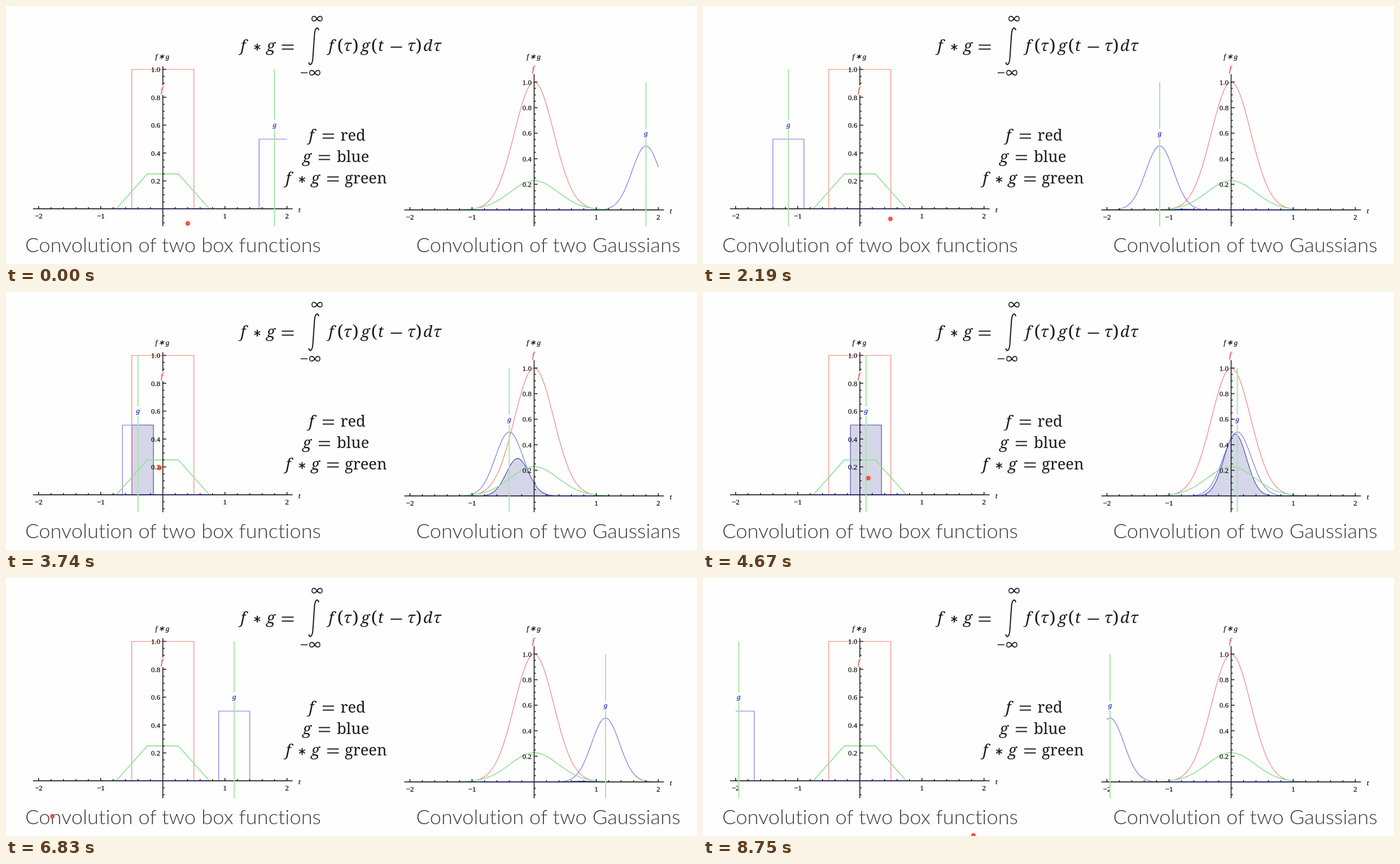
An HTML page that plays this animation: 1224 by 458 pixels, repeating every 8.85 s.

```html
<!DOCTYPE html>
<html lang="en">
<head>
<meta charset="utf-8">
<title>Convolution</title>
<style>
  html, body { margin: 0; width: 100%; height: 100%; overflow: hidden; background: #fefefe; }
  svg { display: block; width: 1224px; height: 458px; }
  text { text-anchor: middle; }
  .caption { font: 300 36.3px Lato, sans-serif; fill: #3c3c3c; font-variant-ligatures: none; }
  .math { font: italic 28px "Noto Serif", serif; fill: #1c1c1c; }
  .word { font: 27.4px "Noto Serif", serif; fill: #1c1c1c; text-anchor: start; }
  .sign { fill: none; stroke: #1c1c1c; stroke-width: 2; }
  .thin { stroke-width: 1.6; }
  .tick { font: 13px "Liberation Serif", serif; fill: #111; stroke: #111; stroke-width: .25; }
  .tick.right { text-anchor: end; }
  .label { font: italic 13px "Liberation Serif", serif; fill: #111; stroke-width: .25; }
  .axis { fill: none; stroke: #151515; stroke-width: 1.5; }
  .curve { fill: none; stroke-width: 1.2; stroke-linejoin: round; }
  .f { stroke: #f0857b; }
  .g { stroke: #7878dc; }
  .fg { stroke: #92e092; stroke-width: 1.6; }
  .base { stroke: #2c2c90; }
  .product { fill: #d6d6e9; stroke: #4848b4; stroke-width: 1.2; }
  .now { stroke: #a6e8a4; stroke-width: 2; }
</style>
</head>
<body>
<svg id="stage" viewBox="0 0 1224 458"></svg>
<script>
const LOOP = 8850, HOLD = 100, STEP = 100, UNIT = 110;
const stage = document.getElementById("stage");

function add(parent, tag, attrs, text) {
  const el = document.createElementNS("http://www.w3.org/2000/svg", tag);
  for (const k in attrs) el.setAttribute(k, attrs[k]);
  if (text !== undefined) el.textContent = text;
  parent.appendChild(el);
  return el;
}
const path = (cls, d = "", parent = stage) => add(parent, "path", { class: cls, d });
const write = (cls, x, y, s, style = "", parent = stage) =>
  add(parent, "text", { class: cls, x, y, style }, s);

// Formula signs
const equals = (x, y, w) => path("sign", `M${x} ${y - 3.5}h${w}M${x} ${y + 3.5}h${w}`);
const star = (x, y) => path("sign", `M${x} ${y - 6}v12M${x - 5.2} ${y - 3}l10.4 6M${x - 5.2} ${y + 3}l10.4 -6`);
const infinity = (x, y) => path("sign thin",
  `M${x} ${y}c3 -5 9 -6 9 0s-6 5 -9 0c-3 -5 -9 -6 -9 0s6 5 9 0`);

function drawFormula() {
  const row = [["f", 420], ["g", 469], ["f", 576], ["τ", 605], ["g", 636.5], ["t", 664],
    ["τ", 718], ["d", 747], ["τ", 764]];
  row.forEach(([s, x]) => write("math", x, 80, s));
  [["(", 592], [")", 619], ["(", 652], [")", 731]].forEach(([s, x]) =>
    write("math", x, 81, s, "font-style:normal;font-size:31px"));
  star(445, 73);
  equals(488.5, 73, 21);
  path("sign", "M681.5 73h20");
  path("sign thin", "M522 118.5h12");
  infinity(551, 22.5);
  infinity(547, 118.5);
  path("sign", "M554 43C553 37 547.5 37 546.5 50L543.5 93C542.5 106 537 106 536.5 100");

  write("math", 541, 239, "f");
  equals(561, 231, 20);
  write("word", 592.5, 239, "red");
  write("math", 533, 277, "g");
  equals(554, 269, 20);
  write("word", 586, 277, "blue");
  write("math", 500, 315, "f");
  star(524.5, 308);
  write("math", 548, 315, "g");
  equals(569, 307, 20.5);
  write("word", 600, 315, "green");
}

// Each plot: origin, height of one unit, top of the vertical axis, label heights
const plots = [
  { ox: 277.8, oy: 360, sy: 247.5, top: 107, fy: 150, gy: 212, box: true },
  { ox: 935.5, oy: 362, sy: 227, top: 121, fy: 113, gy: 227, box: false }
];

function sample(p, fn) {
  let d = "";
  for (let i = 0; i <= 200; i++) {
    const x = -2 + i * 0.02;
    d += (i ? "L" : "M") + p.X(x).toFixed(2) + " " + p.Y(fn(x)).toFixed(2);
  }
  return d;
}
const trace = (p, pts) => "M" + pts.map(([x, y]) => p.X(x) + " " + p.Y(y)).join("L");

const bell = x => Math.exp(-5 * x * x);
const kernel = x => 0.5 * Math.exp(-10 * x * x);
const blend = x => 0.5 * Math.sqrt(Math.PI / 15) * Math.exp(-x * x * 10 / 3);

function drawAxes(p) {
  const { ox, oy } = p;
  let d = `M${ox - 230} ${oy}h460M${ox} ${p.top}V391`;
  for (let i = -10; i <= 10; i++) d += `M${p.X(i / 5)} ${oy}v${i % 5 ? -3 : -5}`;
  for (let i = -2; i <= 20; i++) d += `M${ox} ${p.Y(i / 20)}h${i % 4 ? 3 : 6}`;
  path("axis", d);
  if (p.box) add(stage, "rect", { x: ox - 7, y: 141, width: 14, height: 17, fill: "#fefefe" });
  for (const i of [-2, -1, 1, 2])
    write("tick", p.X(i), oy + 16.5, i < 0 ? "−" + -i : i);
  for (let i = 1; i <= 5; i++)
    write("tick right", ox - 4.5, p.Y(i / 5) + 4.5, (i / 5).toFixed(1));
  write("label", ox, 94, "f∗g", "letter-spacing:1.8px;stroke:#111");
  write("label", ox + 242, oy + 6, "t", "stroke:#111");
  write("label", ox - 1.5, p.fy + 4, "f", "fill:#e0402f;stroke:#e0402f;font-size:14px");
}

function buildPlot(p) {
  p.X = x => p.ox + UNIT * x;
  p.Y = y => p.oy - p.sy * y;
  p.product = path("product");
  path("curve f", p.box
    ? trace(p, [[-2, 0], [-.5, 0], [-.5, 1], [.5, 1], [.5, 0], [2, 0]])
    : sample(p, bell));
  p.g = path("curve g");
  path("curve fg", p.box
    ? trace(p, [[-2, 0], [-.75, 0], [-.25, .25], [.25, .25], [.75, 0], [2, 0]])
    : sample(p, blend));
  drawAxes(p);
  const reach = p.box ? .75 : 1;
  path("curve base", `M${p.X(-reach)} ${p.oy}H${p.X(reach)}`);
  p.marker = add(stage, "g", {});
  path("now", `M0 ${p.Y(1)}V391`, p.marker);
  add(p.marker, "rect", { x: -4.5, y: p.gy - 9, width: 9, height: 17, fill: "#fefefe" });
  write("label", 0, p.gy + 3, "g", "fill:#2424c0;stroke:#2424c0", p.marker);
}

function updatePlot(p, c) {
  p.marker.setAttribute("transform", `translate(${p.X(c)})`);
  if (!p.box) {
    p.g.setAttribute("d", sample(p, x => kernel(x - c)));
    p.product.setAttribute("d", sample(p, x => bell(x) * kernel(x - c)));
    return;
  }
  const l = Math.max(-2, c - .25), r = Math.min(2, c + .25);
  const pts = [[l, .5], [r, .5]];
  if (l > -2) pts.unshift([-2, 0], [l, 0]);
  if (r < 2) pts.push([r, 0], [2, 0]);
  p.g.setAttribute("d", trace(p, pts));
  const a = Math.max(l, -.5), b = Math.min(r, .5);
  p.product.setAttribute("d", b - a > 1e-6 ? trace(p, [[a, 0], [a, .5], [b, .5], [b, 0]]) + "Z" : "");
}

// Laser pointer stops: time, x, y
const stops = [[0, 322, 386], [1300, 329, 389], [2190, 332, 378], [3740, 272, 312],
  [5610, 314, 349], [6830, 82, 423], [7150, 110, 448], [8000, 300, 456], [8750, 479, 457]];

function pointerAt(ms) {
  let i = 0;
  while (i < stops.length - 2 && ms > stops[i + 1][0]) i++;
  const [t0, x0, y0] = stops[i], [t1, x1, y1] = stops[i + 1];
  const k = (ms - t0) / (t1 - t0);
  return [x0 + (x1 - x0) * k, y0 + (y1 - y0) * k];
}

plots.forEach(buildPlot);
drawFormula();
write("caption", 296, 437, "Convolution of two box functions");
write("caption", 960.5, 437, "Convolution of two Gaussians");
const pointer = add(stage, "g", {});
[[5.5, "#ff8a80", .4], [3.4, "#f2332a", 1], [1.2, "#ff9a90", 1]].forEach(([r, fill, opacity]) =>
  add(pointer, "circle", { r, fill, opacity }));

function render(now) {
  const ms = Math.min(now % LOOP, LOOP - HOLD);
  const index = (76 + Math.floor(ms / STEP + .3)) % 81;
  plots.forEach(p => updatePlot(p, (index - 40) / 20));
  pointer.setAttribute("transform", `translate(${pointerAt(ms)})`);
}

const start = performance.now();
function tick() {
  render(performance.now() - start);
  requestAnimationFrame(tick);
}
tick();
</script>
</body>
</html>
```
